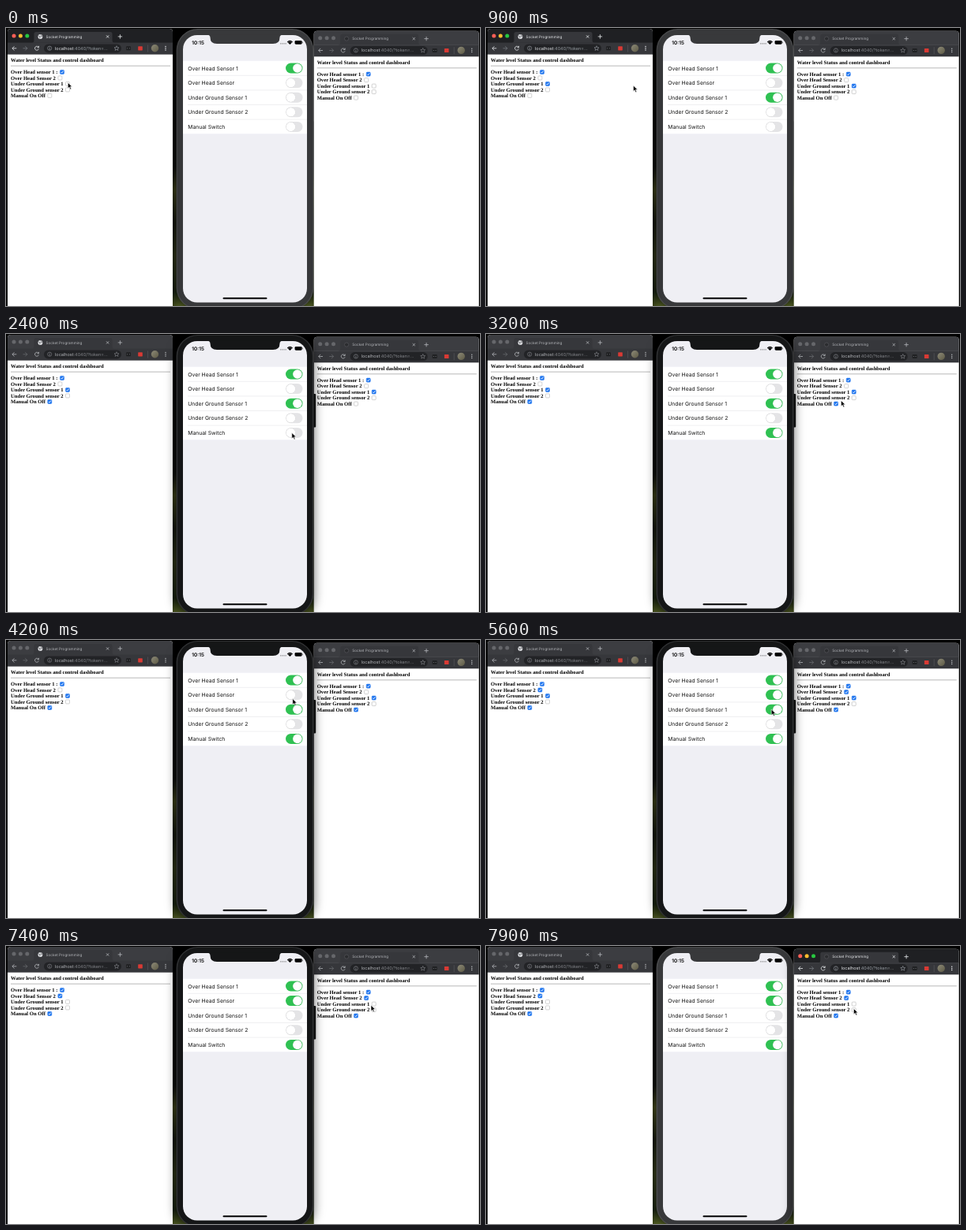
An HTML page for the animation above (8000 ms loop, 600x353 px).

```html
<!DOCTYPE html>
<html lang="en">
<head>
<meta charset="utf-8">
<title>Water level dashboard</title>
<style>
html, body { margin: 0; width: 100%; height: 100%; overflow: hidden; background: #000; }
svg { display: block; width: 600px; height: 353px; text-rendering: geometricPrecision; }
text { white-space: pre; }
.ui { font-family: Inter, Roboto, sans-serif; }
.page { font: bold 6.65px "Liberation Serif", "Times New Roman", serif; fill: #000; }
.win { --strip: #3c3d41; --bar: #36373b; --fg: #b4b6ba; --dim: #85878c; --a: #66676b; --b: #66676b; --c: #66676b; }
.win.on { --strip: #1f2023; --fg: #e8eaed; --dim: #9aa0a6; --a: #fe5f57; --b: #febc2e; --c: #28c840; }
.base { filter: drop-shadow(0 2px 3px rgba(0, 0, 0, .35)); }
.on .base { filter: drop-shadow(0 4px 7px rgba(0, 0, 0, .6)); }
.phone { --case: #38393b; --rim: #4a4b4d; }
.phone.on { --case: #151617; --rim: #303133; }
.box { fill: #fff; stroke: #b4b4b4; stroke-width: .6; }
.tick { fill: none; stroke: none; stroke-width: .9; }
.checked .box { fill: #2176ee; stroke: #2176ee; }
.checked .tick { stroke: #fff; }
.track { fill: #e4e4e6; }
.knob { fill: #fff; filter: drop-shadow(0 .5px .6px rgba(0, 0, 0, .25)); }
.checked .track { fill: #2fc152; }
.checked .knob { transform: translateX(8.4px); }
.line { fill: none; stroke: var(--fg); stroke-width: .8; }
</style>
</head>
<body>
<svg id="stage" viewBox="0 0 600 353" xmlns="http://www.w3.org/2000/svg">
  <defs>
    <linearGradient id="leaves" x1="0" y1="0" x2="0" y2="1">
      <stop offset="0" stop-color="#000"/>
      <stop offset=".5" stop-color="#0b0c0a"/>
      <stop offset=".58" stop-color="#3c4018"/>
      <stop offset=".7" stop-color="#14180c"/>
      <stop offset=".82" stop-color="#2e3416"/>
      <stop offset=".95" stop-color="#1a2410"/>
      <stop offset="1" stop-color="#4e5a22"/>
    </linearGradient>
    <linearGradient id="face" x1="0" y1="0" x2="1" y2="1">
      <stop offset="0" stop-color="#8d8a78"/>
      <stop offset="1" stop-color="#5d5a45"/>
    </linearGradient>
  </defs>
  <rect width="600" height="353" fill="#000"/>
  <rect x="211" width="180" height="353" fill="url(#leaves)"/>
  <g id="layers"></g>
  <path id="cursor" d="M0 0V7.4L1.8 5.8L3 8.6L4.3 8L3.1 5.3H5.4Z" fill="#000" stroke="#fff" stroke-width=".6"/>
</svg>
<script>
const LOOP = 8000, STEP = 100;

// Sensors: web label, phone label, checkbox x, web y, phone y
const SENSORS = [
  ["Over Head sensor 1 :", "Over Head Sensor 1", 71],
  ["Over Head Sensor 2", "Over Head Sensor", 68.4],
  ["Under Ground sensor 1", "Under Ground Sensor 1", 78],
  ["Under Ground sensor 2", "Under Ground Sensor 2", 78],
  ["Manual On Off", "Manual Switch", 55.3]
].map(([web, app, x], i) => ({ web, app, x, webY: 55.9 + i * 7.5, appY: 51 + i * 18.6 }));

// Toggles: time, sensor, value, views that change
const TOGGLES = [
  [0, 0, true, "left phone right"],
  [100, 2, true, "left phone right"],
  [2400, 4, true, "left"],
  [2500, 4, true, "phone right"],
  [4700, 1, true, "left phone right"],
  [5700, 2, false, "left phone right"]
];

// Stacking, back to front; the last one is active
const STACKS = [
  [0, "phone right left"],
  [2200, "right left phone"],
  [7600, "left phone right"]
];

// Pointer: time, x, y
const MOVES = [
  [0, 78.3, 69.3], [300, 78.3, 69.3], [600, 79.5, 68.5], [700, 79.5, 68.5],
  [1300, 492, 86], [1500, 455, 90], [1700, 455, 90], [1800, 388.6, 90],
  [2200, 361.8, 125.4], [2600, 361.8, 125.4], [3100, 456, 80], [3500, 414, 108],
  [3600, 414, 108], [3700, 380, 128.5], [3800, 380, 128.5], [4000, 363, 84],
  [4100, 363, 84], [4200, 362.8, 74.6], [4700, 362.8, 74.6], [5100, 372, 143],
  [5500, 361.2, 88], [5700, 361.2, 88], [6000, 400, 143], [6400, 479, 109],
  [6500, 472, 80], [6600, 472, 80], [6700, 462, 76], [6800, 462, 76],
  [6900, 460.8, 73.8], [7300, 460.8, 73.8], [7600, 465.4, 79.4], [8000, 465.4, 79.4]
];

const label = (x, y, size, text, fill, extra = "") =>
  `<text class="ui" x="${x}" y="${y}" font-size="${size}" fill="${fill}" ${extra}>${text}</text>`;

const dot = (x, y, r, fill) => `<circle cx="${x}" cy="${y}" r="${r}" fill="${fill}"/>`;

const line = (d, extra = "") => `<path class="line" d="${d}" ${extra}/>`;

function browserChrome(favicon) {
  return `
    <path class="base" d="M2 5Q2 1 6 1H207Q211 1 211 5V360H2Z" fill="#fff"/>
    <path d="M2 19V5Q2 1 6 1H207Q211 1 211 5V19Z" fill="var(--strip)"/>
    <rect x="2" y="18.6" width="209" height="15" fill="var(--bar)"/>
    <path d="M33 18.8Q35.5 18.6 35.5 16V7.5Q35.5 5 38 5H132Q134.500 5 134.500 7.5V16Q134.500 18.600 137 18.800Z" fill="var(--bar)"/>
    ${dot(10, 10, 2.5, "var(--a)")}${dot(18.4, 10, 2.5, "var(--b)")}${dot(26.8, 10, 2.5, "var(--c)")}
    ${favicon}
    ${label(50.6, 12.7, 4.65, "Socket Programming", "var(--fg)")}
    ${line("M127 9.300L130.200 12.500M130.200 9.300L127 12.500M141.700 10.900H147.100M144.400 8.200V13.600")}
    ${line("M13.300 25.800H8M10.500 23.200L7.900 25.800L10.500 28.400")}
    ${line("M21.500 25.800H26.800M24.300 23.200L26.900 25.800L24.300 28.400", 'style="stroke:var(--dim)" opacity=".6"')}
    ${line("M41.100 24.300A2.500 2.500 0 1 0 41.400 26.600M41.500 22.800V24.800H39.400")}
    <rect x="48" y="20.400" width="98" height="11" rx="5.500" fill="#222326"/>
    ${line("M55.2 25.300V27.600M55.2 23.700V24.500", 'style="stroke:var(--dim)"')}
    <circle cx="55.200" cy="25.700" r="2.600" fill="none" stroke="var(--dim)" stroke-width=".6"/>
    <text class="ui" x="62" y="27.700" font-size="5.500" fill="var(--fg)">localhost<tspan fill="var(--dim)">:4040/?token=…</tspan></text>
    <path d="M140 22.700L140.800 24.800L143 24.900L141.300 26.300L141.900 28.400L140 27.200L138.100 28.400L138.700 26.300L137 24.900L139.200 24.800Z" fill="none" stroke="var(--dim)" stroke-width=".6"/>
    <rect x="152" y="23.200" width="6" height="5" rx="1" fill="#1f2022"/>
    ${dot(153.600, 25.700, .5, "#808286")}${dot(156.300, 25.700, .5, "#808286")}
    <rect x="167.200" y="23.200" width="5.600" height="5.200" rx=".6" fill="#d93a34"/>
    <path d="M179.500 21.500V30.500" stroke="#606166" stroke-width=".5"/>
    ${dot(188.500, 25.700, 4.700, "url(#face)")}
    ${[23.500, 25.700, 27.900].map(y => dot(202, y, .75, "var(--fg)")).join("")}`;
}

function webPage() {
  const rows = SENSORS.map(s => `
    <text class="page" x="6" y="${s.webY + 2.1}">${s.web}</text>
    <g class="toggle" transform="translate(${s.x} ${s.webY})">
      <rect class="box" x="-2.500" y="-2.500" width="5" height="5" rx="1"/>
      <path class="tick" d="M-1.500 .1L-.4 1.200L1.600 -1.300"/>
    </g>`).join("");
  return `
    <text class="page" x="6" y="43.100">Water level Status and control dashboard</text>
    <path d="M6 48.100H208" stroke="#9a9a9a" stroke-width=".7"/>${rows}`;
}

function phone() {
  const rows = SENSORS.map((s, i) => `
    ${label(230.300, s.appY + 2.500, 6.800, s.app, "#111")}
    ${i < 4 ? `<path d="M230 ${s.appY + 9.300}H381" stroke="#dedee2" stroke-width=".5"/>` : ""}
    <g class="toggle" transform="translate(354 ${s.appY - 6.500})">
      <rect class="track" width="21.500" height="13" rx="6.500"/>
      <circle class="knob" cx="6.500" cy="6.500" r="5.800"/>
    </g>`).join("");
  return `
    <rect x="388" y="76" width="4.200" height="42.500" rx="1" fill="var(--case)"/>
    <rect class="base" x="215.600" y="1" width="173.800" height="356" rx="27" fill="var(--rim)"/>
    <rect x="217.200" y="2" width="170.600" height="354" rx="26" fill="var(--case)"/>
    <rect x="224" y="9" width="157" height="339.500" rx="18" fill="#efeff4"/>
    <rect x="224" y="41.700" width="157" height="92.600" fill="#fff"/>
    ${rows}
    <path d="M255 8.500Q258.500 9 258.500 12Q258.500 20 267 20H338Q346.500 20 346.500 12Q346.500 9 350 8.500Z" fill="var(--case)"/>
    ${label(235.300, 20.700, 6.400, "10:15", "#000", 'font-weight="600"')}
    ${[347.800, 349.900, 352, 354.100].map(x => dot(x, 19.800, .6, "#555")).join("")}
    <path d="M359.400 21L355.800 17.400Q359.400 14.300 363 17.400Z" fill="#000"/>
    <path d="M356.700 18.300Q359.400 16.200 362.100 18.300" stroke="#efeff4" stroke-width=".4" fill="none"/>
    <rect x="365.600" y="15.900" width="9" height="4.800" rx="1.400" fill="#000"/>
    <rect x="375" y="17.500" width=".7" height="1.700" fill="#555"/>
    <rect x="274.500" y="342.300" width="56" height="2" rx="1" fill="#000"/>`;
}

const globe = `${dot(43.400, 10.900, 2.900, "#e8eaed")}
  <path d="M41.200 10L43.200 10.600L42.500 12.700M43.600 8.500L45.400 9.900L44.400 11.600" stroke="#45464a" stroke-width=".8" fill="none"/>`;
const idleIcon = `<circle cx="43.400" cy="10.900" r="2.600" fill="#2b2c2f" stroke="#5b5c60" stroke-width=".6"/>`;

const layers = document.getElementById("layers");
layers.innerHTML = `
  <g id="left" class="win">${browserChrome(globe)}${webPage()}</g>
  <g id="phone" class="phone">${phone()}</g>
  <g id="right" class="win" transform="translate(387.700 2.700)">${browserChrome(idleIcon)}${webPage()}</g>`;

const cursor = document.getElementById("cursor");
const views = {};
for (const id of ["left", "phone", "right"]) {
  const node = document.getElementById(id);
  views[id] = { node, toggles: [...node.querySelectorAll(".toggle")] };
}

let stack = "";
function restack(t) {
  const next = STACKS.filter(([at]) => at <= t).pop()[1];
  if (next === stack) return;
  stack = next;
  const ids = stack.split(" ");
  ids.forEach((id, i) => {
    views[id].node.classList.toggle("on", i === 2);
    layers.append(views[id].node);
  });
}

function setToggles(t) {
  for (const [id, { toggles }] of Object.entries(views)) {
    const values = SENSORS.map(() => false);
    for (const [at, sensor, value, where] of TOGGLES) {
      if (at <= t && where.includes(id)) values[sensor] = value;
    }
    toggles.forEach((node, i) => node.classList.toggle("checked", values[i]));
  }
}

function moveCursor(t) {
  const i = MOVES.findIndex(m => m[0] > t);
  const [t0, x0, y0] = MOVES[i - 1], [t1, x1, y1] = MOVES[i];
  const k = (t - t0) / (t1 - t0), e = k * k * (3 - 2 * k);
  cursor.setAttribute("transform", `translate(${x0 + (x1 - x0) * e} ${y0 + (y1 - y0) * e})`);
}

function draw(now) {
  const t = Math.floor((now % LOOP) / STEP) * STEP;
  restack(t);
  setToggles(t);
  moveCursor(t);
}

let start;
function tick(now) {
  start ??= now;
  draw(Math.max(0, now - start));
  requestAnimationFrame(tick);
}
draw(0);
requestAnimationFrame(tick);
</script>
</body>
</html>
```
